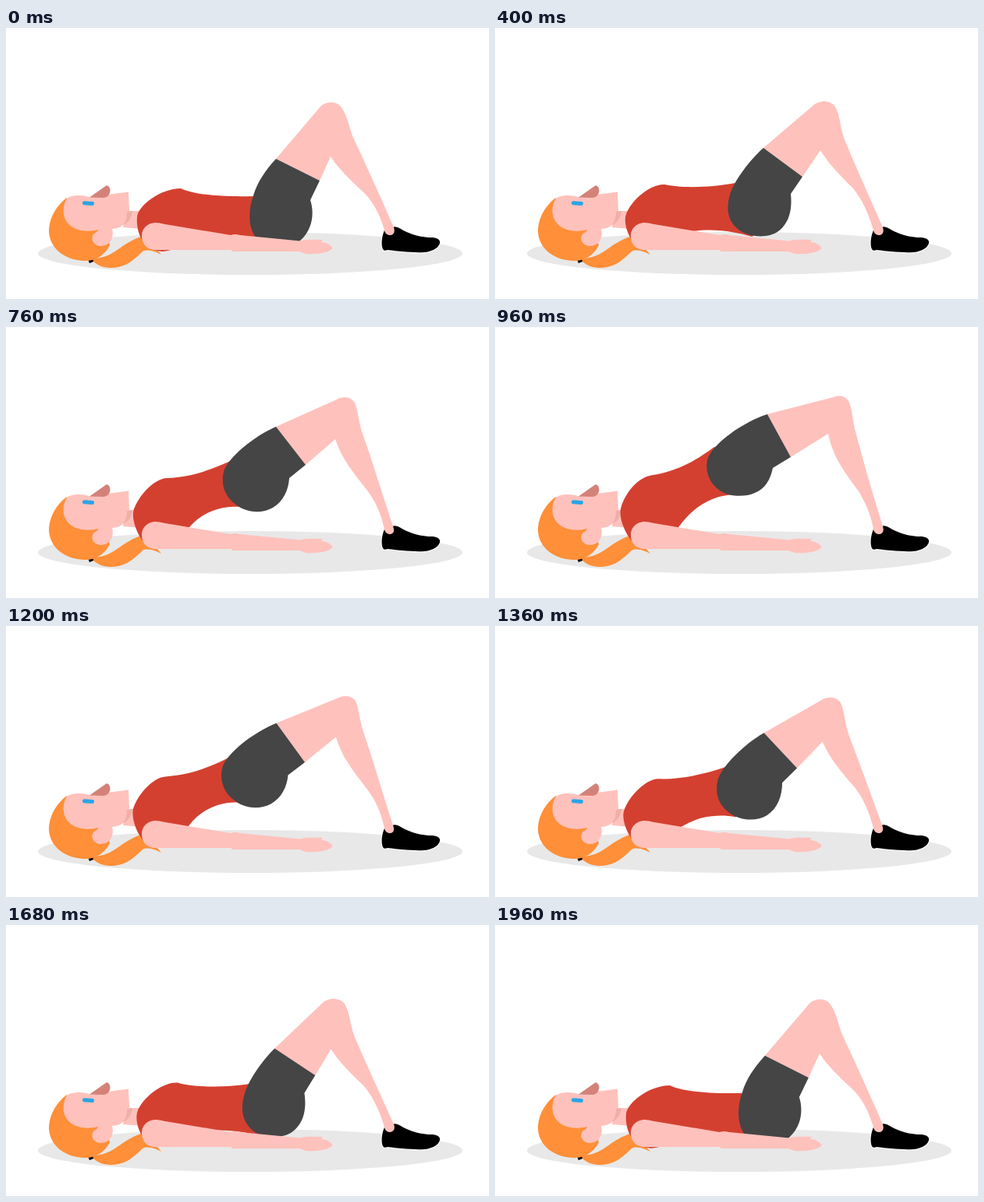
Write an HTML page that moves like this. It is 619 px wide and 348 px high and loops after 2 s.

```html
<!DOCTYPE html>
<html lang="en">
<head>
<meta charset="utf-8">
<title>Glute bridge</title>
<style>
  html, body { margin: 0; width: 100%; height: 100%; overflow: hidden; background: #fff; }
  svg { display: block; width: 619px; height: 348px; }
  .skin { fill: #ffc1bc; }
  .hair { fill: #ff8f38; }
</style>
</head>
<body>
<svg viewBox="0 0 619 348">
  <ellipse cx="313" cy="289.500" rx="272" ry="27.500" fill="#e8e8e8"/>
  <!-- head -->
  <path class="hair" d="M112 296C140 295 146 276 176 267L193 284L199 291C190 286 180 284 175 287C160 302 150 308 134 308C124 308 116 304 111 299Z"/>
  <path d="M105 297L111 295L112 300L107 302Z"/>
  <path class="hair" d="M78 218C64 228 55 245 55 261C56 285 78 299 102 299C114 299 127 292 133 279L125 250L80 225Z"/>
  <path class="skin" d="M78 219C84 214 98 214 107 217L157 210.500L158 234C156 246 153 257 136 258C139 268 134 280 122 280C110 279 108 269 113 264C116 262 118 261 118 259C98 264 78 258 74 240C73 233 74 225 78 219Z"/>
  <path class="skin" d="M154 235H174V258L150 256Z"/>
  <path d="M155 236L162 235C161 244 157 250 150 253C154 247 155 242 155 236Z" fill="#eeb0a8"/>
  <path d="M107 217.500L129 202Q134 204 133.500 210Q132 217 125 218Z" fill="#d48279"/>
  <path d="M100.500 224.700L110.500 225.500" stroke="#28a5e5" stroke-width="5" stroke-linecap="round"/>
  <!-- body -->
  <path id="torso" fill="#d44030"/>
  <path stroke="#fff" stroke-width="2" paint-order="stroke" d="M487 256C482 264 480 278 483 284Q484 287 489 285C505 287 525 289 536 288C549 287 557 280 556 274Q555 270 547 269C530 269 516 264 506 258Q500 254 495 256Z"/>
  <path id="leg" class="skin"/>
  <path id="shorts" fill="#454545"/>
  <path class="skin" d="M192 250Q196 250 204 252L288 266Q293 264 300 266L377 273.500C386 271 398 272 406 272L404 275C412 275 418 280 418.500 283C414 288 402 291 384 290L376 287L289 287V285L192 285C180 285 174 277 174 267C174 257 182 250 192 250Z"/>
</svg>
<script>
// Each part has four poses, from lying flat to hips raised.
const poses = {
  torso: [
    'M185 284C170 272 167 256 168 243C169 228 198 206 224 206C240 214 276 217 316 216L350 240L330 272C300 272 270 272 240 275C225 282 210 286 200 287Z',
    'M181 280C171 268 166 255 167 244C169 226 198 199 218 201C235 205 270 206 308 199L350 230L330 268C308 262 280 256 248 262C222 268 205 280 195 280Z',
    'M180 280C168 268 162 250 163 238C166 222 188 194 207 194C235 193 262 184 290 171L320 200L300 231C275 229 252 238 236 256C225 268 210 280 195 280Z',
    'M180 280C166 266 159 246 161 234C165 216 182 192 203 190C232 185 256 173 281 154L330 185L315 216C285 212 256 228 236 256C228 268 210 280 195 280Z'
  ],
  leg: [
    'M346 168L402 102C408 94 423 93 429 101C438 112 440 130 446 143C464 181 482 222 497 256C501 268 487 269 485 260C480 242 471 222 456 209C438 192 425 179 416 165L402 196Z',
    'M344 154L406 101C414 92 430 92 436 101C443 113 442 130 449 146C465 184 482 222 497 256C501 268 487 269 485 260C480 242 472 222 459 206C441 188 428 175 417 157L394 191Z',
    'M346 128L424 93C433 88 445 90 448 100C452 112 452 124 458 140C472 180 483 217 496 256C501 268 487 269 485 260C481 242 475 226 463 210C445 187 430 169 422 144L384 177Z',
    'M349 112L434 90C444 86 453 91 455 100C459 113 458 122 463 138C474 180 485 217 497 256C501 268 487 269 485 260C482 242 476 228 466 211C447 185 433 167 427 137L379 167Z'
  ],
  shorts: [
    'M346 168L402 196L390 221C395 236 394 258 377 273C365 284 330 284 318 266C310 252 311 232 317 215C322 198 333 182 346 168Z',
    'M344 154L394 191L379 213C381 231 378 250 363 261C352 270 325 270 311 258C298 247 296 232 301 214C306 197 326 170 344 154Z',
    'M346 128L384 177L363 194C362 210 355 224 342 232C326 241 305 238 292 226C281 217 275 202 279 186C284 168 318 140 346 128Z',
    'M349 112L379 167L356 181C353 196 346 208 333 213C320 219 300 218 288 210C275 201 269 186 272 171C278 150 318 122 349 112Z'
  ]
};
const knots = [0.4, 0.76, 0.96];
const number = /\d+/g;
const parts = Object.entries(poses).map(([id, paths]) => ({
  el: document.getElementById(id),
  shape: paths[0],
  values: paths.map(p => p.match(number).map(Number))
}));

// Smooth pose weights with zero speed at the floor.
function weights(u) {
  const w = knots.map(k => knots.reduce(
    (p, j) => j === k ? p : p * (u - j) / (k - j), (u / k) ** 2));
  return [1 - w[0] - w[1] - w[2], ...w];
}

function draw(now) {
  const t = Math.floor(now % 2000 / 40) * 40;
  const w = weights(1 - Math.abs(1 - t / 1000));
  for (const { el, shape, values } of parts) {
    let i = 0;
    const blend = () => {
      const x = values.reduce((sum, v, k) => sum + v[i] * w[k], 0);
      i++;
      return x.toFixed(2);
    };
    el.setAttribute('d', shape.replace(number, blend));
  }
}

const start = performance.now();
function tick() {
  draw(performance.now() - start);
  requestAnimationFrame(tick);
}
tick();
</script>
</body>
</html>
```
